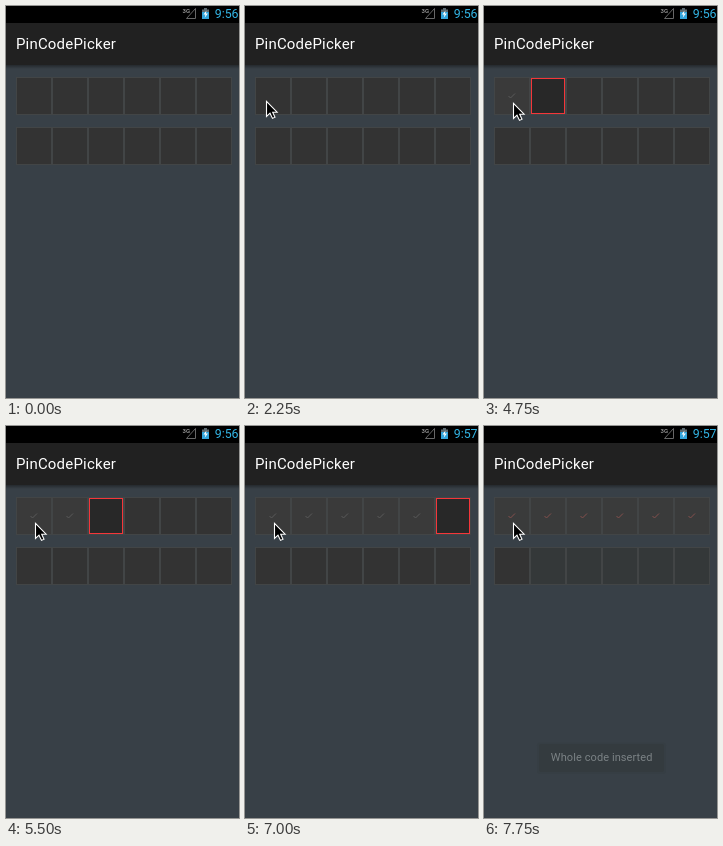
Write an HTML page that moves like this. It is 233x392 px and loops after 8000 ms.

```html
<!DOCTYPE html>
<html lang="en">
<head>
<meta charset="utf-8">
<title>PinCodePicker</title>
<style>
html, body { margin: 0; width: 100%; height: 100%; overflow: hidden; background: #384047; }
svg { display: block; width: 233px; height: 392px; }
text { font-family: Roboto, "Noto Sans", sans-serif; }
</style>
</head>
<body>
<svg viewBox="0 0 233 392">
  <defs>
    <linearGradient id="shade" x2="0" y2="1">
      <stop offset="0" stop-color="#000" stop-opacity=".35"/>
      <stop offset="1" stop-color="#000" stop-opacity="0"/>
    </linearGradient>
  </defs>
  <rect width="233" height="392" fill="#384047"/>
  <rect y="59" width="233" height="4" fill="url(#shade)"/>
  <rect y="17" width="233" height="42" fill="#212121"/>
  <rect width="233" height="17" fill="#000"/>
  <text x="9.9" y="43" font-size="15" letter-spacing=".2" fill="#fff">PinCodePicker</text>

  <text x="176.5" y="6.5" font-size="6" font-weight="500" fill="#aaa">3G</text>
  <path d="M180.5 12.5H189.5V2.5Z" fill="none" stroke="#666"/>
  <path d="M198 2h3v1.5h2V6h-7V3.5h2z" fill="#5c6a70"/>
  <path d="M196 6h7v7h-7z" fill="#33a5dc"/>
  <path d="M200.5 4.5l-3 4h2l-.8 3.2 3.2-4.2h-2z" fill="#fff"/>
  <text id="clock" x="208.7" y="12" font-size="12.4" fill="#33b5e5">9:56</text>

  <g id="cells"></g>

  <g id="toast">
    <rect x="53" y="316.5" width="129" height="31.5" rx="3" fill="#363e44"/>
    <rect x="55" y="318" width="125" height="28" rx="2" fill="#343b3f"/>
    <text x="66.8" y="335.3" font-size="11" letter-spacing=".09" fill="#7b8285">Whole code inserted</text>
  </g>

  <path id="cursor" d="M.5 1.3V16.4L4 13.2 6.5 18.4 9 17.3 6.7 12.2H11.1Z"
        fill="#000" stroke="#fff" stroke-width="1.1"/>
</svg>
<script>
const LOOP = 8000;
const START = performance.now();
const $ = id => document.getElementById(id);

// [time, x, y] of the pointer tip
const POINTER = [
  [1000, 79, 122], [1250, 51, 99], [1500, 28, 94],
  [2250, 21, 94], [2500, 12, 93], [3250, 29, 96]
];
// [time, focused cell]
const FOCUS = [[0, -1], [2750, 0], [4750, 1], [5500, 2], [6000, 3], [6500, 4], [7000, 5], [7500, 6]];

const STYLES = {
  idle:   { fill: '#333333', stroke: '#333333' },
  active: { fill: '#282828', stroke: '#f4363a' },
  filled: { fill: '#3a3a3a', stroke: '#3a3a3a', check: '#5a5a5a' },
  done:   { fill: '#3a3b3b', stroke: '#3a3b3b', check: '#85504d' },
  faded:  { fill: '#343839', stroke: '#343839' },
  next:   { fill: '#333333', stroke: '#333333' }
};

function add(tag, attrs) {
  const el = document.createElementNS('http://www.w3.org/2000/svg', tag);
  for (const k in attrs) el.setAttribute(k, attrs[k]);
  return $('cells').appendChild(el);
}

const cells = [72, 122].flatMap((y, row) => {
  add('rect', { x: 10, y: y - 1, width: 216, height: 38, fill: '#424546' });
  return Array.from({ length: 6 }, (_, col) => {
    const x = 11 + 36 * col;
    return {
      row, col,
      box: add('rect', { x: x + .5, y: y + .5, width: 33, height: 35 }),
      check: add('path', { d: `M${x + 13.5} ${y + 18}l2 2 4.5-4.5`, fill: 'none' })
    };
  });
});

const stepAt = (steps, t) => steps.filter(s => s[0] <= t).pop();

function styleOf({ row, col }, focus) {
  if (focus === 6) return row === 0 ? 'done' : col === 0 ? 'next' : 'faded';
  if (row === 1 || col > focus) return 'idle';
  return col === focus ? 'active' : 'filled';
}

function draw(t) {
  const focus = stepAt(FOCUS, t)[1];
  for (const cell of cells) {
    const s = STYLES[styleOf(cell, focus)];
    cell.box.setAttribute('fill', s.fill);
    cell.box.setAttribute('stroke', s.stroke);
    cell.check.setAttribute('stroke', s.check || 'none');
  }
  const tip = stepAt(POINTER, t);
  $('cursor').style.display = tip ? '' : 'none';
  if (tip) $('cursor').setAttribute('transform', `translate(${tip[1]} ${tip[2]})`);
  $('clock').textContent = t < 7000 ? '9:56' : '9:57';
  $('toast').style.display = t < 7750 ? 'none' : '';
}

function tick() {
  draw((performance.now() - START) % LOOP);
  requestAnimationFrame(tick);
}
tick();
</script>
</body>
</html>
```
